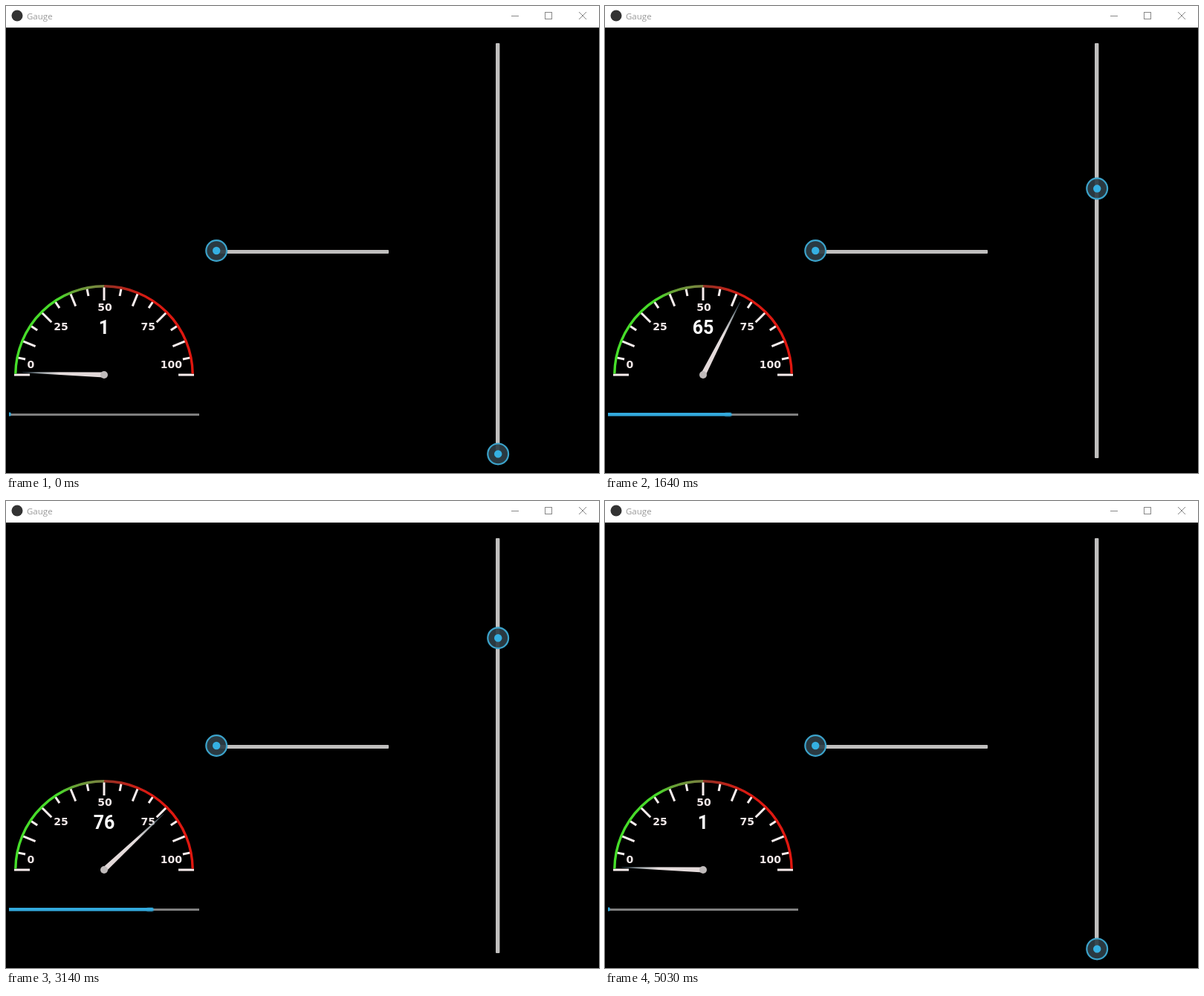
These frames come from a looping animation (798 by 628 pixels, 5060 ms). An HTML page with a canvas:

```html
<!DOCTYPE html>
<html lang="en">
<head>
<meta charset="utf-8">
<title>Gauge</title>
<style>
html, body { margin: 0; width: 798px; height: 628px; overflow: hidden; background: #000; }
canvas { display: block; }
</style>
</head>
<body>
<canvas id="stage" width="798" height="628"></canvas>
<script>
const ctx = document.getElementById('stage').getContext('2d');
const LOOP = 5060;
const CX = 132, CY = 496;
const BLUE = '#33aadd', TRACK = '#c0bfbe';

// time in ms, gauge value
const keys = [
  [0, 1], [24, 1], [50, 2], [550, 22], [1100, 43], [1640, 65], [2190, 87],
  [2488, 99], [2545, 99], [2670, 94.3], [2740, 91.3], [3290, 70.3],
  [3840, 49.3], [4260, 32.3], [5030, 1.3], [LOOP, 1]
];

function valueAt(t) {
  let i = 1;
  while (i < keys.length - 1 && t >= keys[i][0]) i++;
  const [t0, v0] = keys[i - 1], [t1, v1] = keys[i];
  return Math.floor(v0 + (v1 - v0) * (t - t0) / (t1 - t0) + 0.03);
}

const angle = v => Math.PI * (1 + v / 100);

function rect(x, y, w, h, color) {
  ctx.fillStyle = color;
  ctx.fillRect(x, y, w, h);
}

function disc(x, y, r, color) {
  ctx.fillStyle = color;
  ctx.beginPath();
  ctx.arc(x, y, r, 0, 2 * Math.PI);
  ctx.fill();
}

function bar(x, y, w, h, r, color) {
  ctx.fillStyle = color;
  ctx.beginPath();
  ctx.roundRect(x, y, w, h, r);
  ctx.fill();
}

function line(x0, y0, x1, y1) {
  ctx.beginPath();
  ctx.moveTo(x0, y0);
  ctx.lineTo(x1, y1);
  ctx.stroke();
}

function text(str, x, y, font, color, align = 'center') {
  ctx.font = font;
  ctx.fillStyle = color;
  ctx.textAlign = align;
  ctx.fillText(str, x, y);
}

function titleBar() {
  rect(0, 0, 798, 29, '#fff');
  disc(15, 13, 7.5, '#333');
  text('Gauge', 28, 18, '11.5px "Open Sans", sans-serif', '#999', 'left');
  ctx.strokeStyle = '#888';
  ctx.lineWidth = 1;
  line(680, 13.5, 690, 13.5);
  ctx.strokeRect(725.5, 8.5, 9, 9);
  line(771, 8, 781, 18);
  line(781, 8, 771, 18);
}

function knob(x, y) {
  disc(x, y, 14.5, 'rgba(46,62,70,0.92)');
  ctx.strokeStyle = '#3ba3cb';
  ctx.lineWidth = 2.2;
  ctx.beginPath();
  ctx.arc(x, y, 13.9, 0, 2 * Math.PI);
  ctx.stroke();
  disc(x, y, 5.2, '#35b0e2');
}

const rim = ctx.createConicGradient(Math.PI, CX, CY);
[[0, '#46e02a'], [33, '#48da2a'], [39, '#68a236'], [50, '#7a8040'],
 [50, '#8e3426'], [58, '#b8241a'], [67, '#dc1a12'], [100, '#e0160e']]
  .forEach(([v, c]) => rim.addColorStop(v / 200, c));

function dial() {
  ctx.strokeStyle = '#f8eeee';
  ctx.lineWidth = 3;
  for (let i = 0; i <= 16; i++) {
    const a = angle(i * 6.25), c = Math.cos(a), s = Math.sin(a);
    const inner = i % 2 ? 108 : 100;
    const outer = i % 16 ? 118.5 : 121;
    line(CX + inner * c, CY + inner * s, CX + outer * c, CY + outer * s);
  }
  ctx.strokeStyle = rim;
  ctx.lineWidth = 3.4;
  ctx.beginPath();
  ctx.arc(CX, CY, 119.2, Math.PI + 0.012, 2 * Math.PI - 0.012);
  ctx.stroke();
  [['0', 33.3, 487], ['25', 74, 436], ['50', 133, 410], ['75', 191.3, 436], ['100', 222.3, 487]]
    .forEach(([s, x, y]) => text(s, x, y, 'bold 14px "DejaVu Sans", sans-serif', '#f2e8e8'));
}

function needle(v) {
  ctx.save();
  ctx.translate(CX, CY);
  ctx.rotate(angle(v));
  const g = ctx.createLinearGradient(0, 0, 110, 0);
  g.addColorStop(0, '#e2d8d8');
  g.addColorStop(0.55, '#e6dede');
  g.addColorStop(0.8, 'rgba(165,175,180,0.9)');
  g.addColorStop(1, 'rgba(70,100,120,0.5)');
  ctx.fillStyle = g;
  ctx.beginPath();
  ctx.moveTo(0, -3.4);
  ctx.lineTo(110, -0.4);
  ctx.lineTo(110, 0.4);
  ctx.lineTo(0, 3.4);
  ctx.fill();
  ctx.restore();
  disc(CX, CY, 5, '#c0bbbb');
}

function progress(v) {
  const w = 2.56 * v;
  rect(4, 548, 256, 3, '#7f7f7f');
  if (v > 4) {
    bar(w - 6, 546, 11, 7, 3, 'rgba(51,170,221,0.25)');
    bar(4, 547, w, 4.6, [0, 2, 2, 0], BLUE);
  } else {
    bar(4, 546.5, w, 5, [0, 1, 1, 0], BLUE);
  }
}

function draw(t) {
  const v = valueAt(t);
  rect(0, 0, 798, 628, '#000');
  titleBar();
  dial();
  needle(v);
  text(v, CX, 441, 'bold 25px Roboto, sans-serif', '#fff');
  progress(v);
  bar(283, 328, 232, 5, 1, TRACK);
  knob(283.2, 329);
  bar(659, 50, 5.4, 558, 1, TRACK);
  knob(662.2, 608 - 5.576 * v);
}

const start = performance.now();
function tick() {
  draw((performance.now() - start) % LOOP);
  requestAnimationFrame(tick);
}
tick();
</script>
</body>
</html>
```
